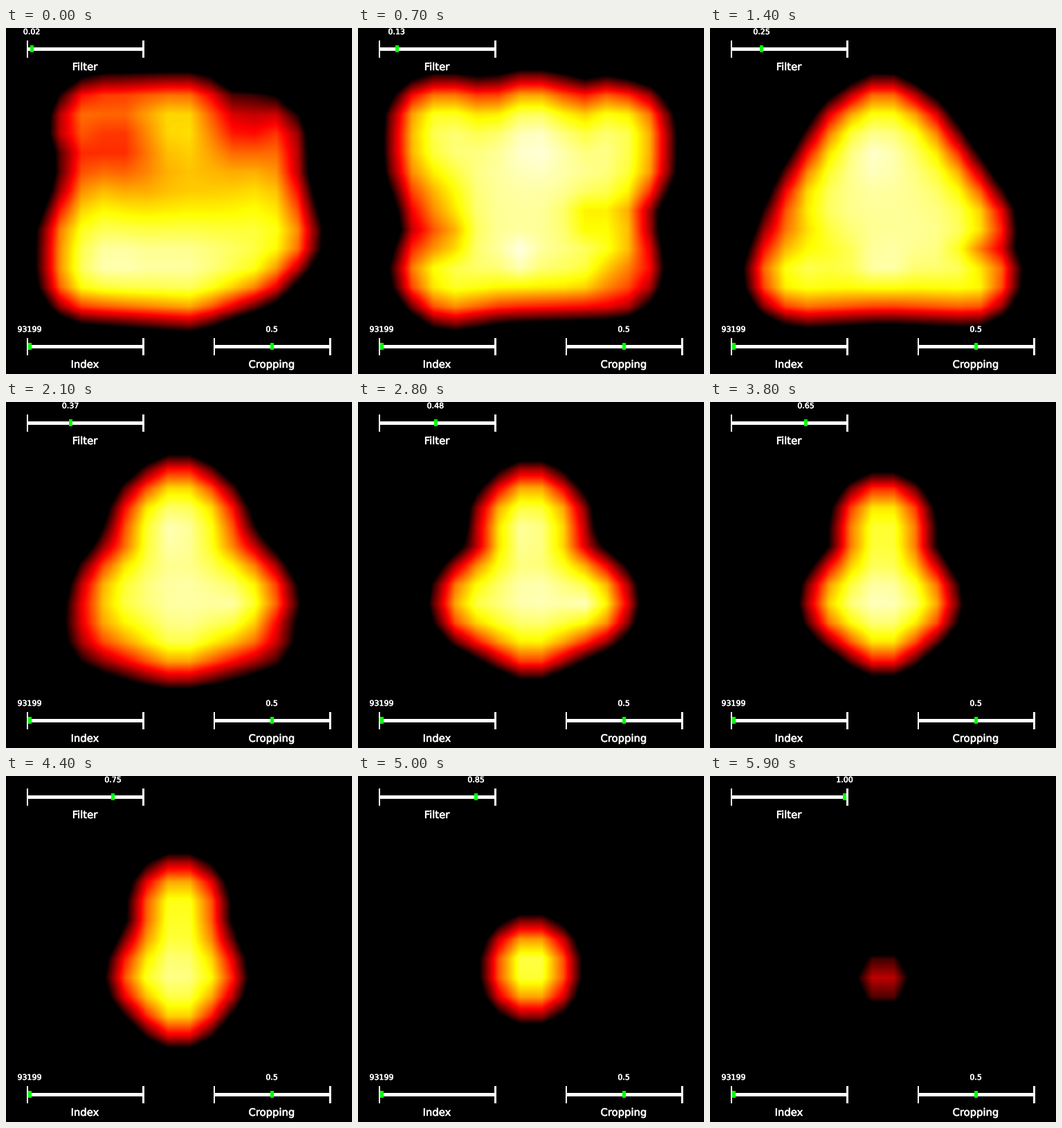
Animation of 500x500 px, one loop 6000 ms. Source, as a matplotlib script:

```python
import numpy as np
import matplotlib.pyplot as plt
from matplotlib import patheffects
from matplotlib.animation import FuncAnimation
from matplotlib.colors import LinearSegmentedColormap
from matplotlib.patches import Rectangle

SIZE, DPI = 500, 100
FRAMES, INTERVAL = 60, 100
COLS, ROWS = 16, 18
REACH = 77  # how far the heat spreads around a core

HEAT = LinearSegmentedColormap.from_list(
    "heat", [(0, "black"), (0.365, "red"), (0.746, "yellow"), (1, "white")])

# Centres of the coarse heat cells, in pixels
GX, GY = np.meshgrid((np.arange(COLS) + 0.5) * SIZE / COLS,
                     (np.arange(ROWS) + 0.5) * SIZE / ROWS)


def core_depth(core):
    """Distance of every cell to a closed polygon, positive inside."""
    best = np.full(GX.shape, np.inf)
    inside = np.zeros(GX.shape, bool)
    for (x0, y0), (x1, y1) in zip(core, core[1:] + core[:1]):
        dx, dy = x1 - x0, y1 - y0
        u = ((GX - x0) * dx + (GY - y0) * dy) / (dx * dx + dy * dy)
        u = np.clip(u, 0, 1)
        best = np.minimum(best, np.hypot(GX - x0 - u * dx, GY - y0 - u * dy))
        if dy:
            crosses = (y0 > GY) != (y1 > GY)
            inside ^= crosses & (GX < x0 + (GY - y0) * dx / dy)
    return np.where(inside, best, -best)


def glow(core, spots=(), reach=REACH, gain=1.0):
    """Heat around a core; spots (x, y, size, change) warm or cool it."""
    depth = (core_depth(core) + reach) / 46
    for x, y, size, change in spots:
        gain = gain + change * np.exp(-((GX - x) ** 2 + (GY - y) ** 2) / (2 * size ** 2))
    return 0.9 * np.where(depth > 0, np.tanh(depth) * gain, depth)


def gourd(top, left, right, bottom, head=2):
    """Core with a straight head on a diamond body."""
    a, b = 250 - head, 250 + head
    return [(250, top), (b, top + head), (b, 235), (right, 288),
            (250, bottom), (left, 288), (a, 235), (a, top + head)]


patchy = glow(
    [(138, 142), (235, 140), (265, 140), (300, 165), (360, 168), (360, 215),
     (381, 300), (350, 332), (265, 362), (120, 352), (120, 305), (140, 255),
     (155, 185)],
    [(155, 160, 45, -0.45), (350, 135, 42, -0.5), (200, 235, 55, -0.22),
     (310, 230, 60, -0.22), (250, 325, 60, 0.09), (150, 347, 35, 0.08)])

square = glow(
    [(114, 142), (147, 142), (185, 170), (235, 137), (268, 137), (322, 175),
     (355, 145), (384, 150), (384, 195), (350, 262), (367, 345), (205, 350),
     (135, 361), (122, 350), (144, 288), (114, 190)],
    [(122, 302, 26, -0.3), (115, 238, 30, -0.17), (380, 360, 26, -0.3),
     (335, 275, 24, -0.2), (258, 165, 38, 0.09), (235, 332, 18, 0.13)])

triangle = glow(
    [(250, 141), (282, 163), (304, 194), (368, 287), (350, 318), (376, 356),
     (250, 351), (140, 357), (124, 354), (151, 282), (165, 252), (198, 195),
     (218, 163)],
    [(120, 295, 28, -0.18), (390, 322, 20, -0.18), (180, 320, 25, -0.1),
     (235, 180, 30, 0.08), (250, 347, 20, 0.1)])

bell = glow(gourd(160, 179, 331, 326, head=15),
            [(236, 190, 28, 0.08), (328, 290, 20, 0.12), (255, 280, 30, 0.06)])
pear = glow(gourd(176, 205, 289, 321), [(250, 290, 40, 0.08)])
slim_pear = glow(gourd(190, 226, 268, 321), reach=72)
disc = glow([(250, 273), (250, 285)], [(250, 266, 25, 0.08)], reach=75)
small_disc = glow([(249, 297), (251, 297)], reach=66)
ember = glow([(249, 293), (251, 293)], reach=40, gain=0.6)

# The head drops off at once between slim_pear and disc
KEYS = [(0, patchy), (7, square), (14, triangle), (28, bell), (38, pear),
        (49, slim_pear), (50, disc), (56, small_disc), (59, ember)]


def field_at(i):
    for (t0, a), (t1, b) in zip(KEYS, KEYS[1:]):
        if i <= t1:
            u = (i - t0) / (t1 - t0)
            return (1 - u) * a + u * b


fig = plt.figure(figsize=(SIZE / DPI, SIZE / DPI), dpi=DPI, facecolor="black")
ax = fig.add_axes([0, 0, 1, 1])
image = ax.imshow(field_at(0), cmap=HEAT, vmin=0, vmax=1, aspect="auto",
                  interpolation="bilinear", extent=(0, SIZE, SIZE, 0))
ax.set_xlim(0, SIZE)
ax.set_ylim(SIZE, 0)
ax.axis("off")


def box(x, y, w, h, color="white"):
    return ax.add_patch(Rectangle((x, y), w, h, fc=color, lw=0, zorder=3))


def label(x, baseline, text, px):
    return ax.text(x, baseline, text, color="white", family="DejaVu Sans",
                   size=px * 72 / DPI, ha="center", va="baseline", zorder=4,
                   path_effects=[patheffects.withStroke(linewidth=0.4,
                                                        foreground="white")])


def slider(x, y, name, knob_x, value):
    box(x, y - 2, 169, 5)
    box(x, y - 12, 2, 25)
    box(x + 167, y - 12, 3, 25)
    label(x + 84, y + 31, name, 14.8)
    knob = box(knob_x - 2, y - 5, 5, 10, "lime")
    return knob, label(knob_x, y - 21, value, 11)


slider(30, 460, "Index", 34, "93199")
slider(300, 460, "Cropping", 384, "0.5")
knob, readout = slider(30, 30, "Filter", 37, "0.02")


def draw(i):
    level = (i + 1) / FRAMES
    x = 34.3 + 160.2 * level
    image.set_data(field_at(i))
    knob.set_x(round(x - 2))
    readout.set_x(x)
    readout.set_text(f"{level:.2f}")
    return image, knob, readout


anim = FuncAnimation(fig, draw, frames=FRAMES, interval=INTERVAL,
                     init_func=lambda: draw(0), repeat=True, repeat_delay=0)
plt.show()
```
